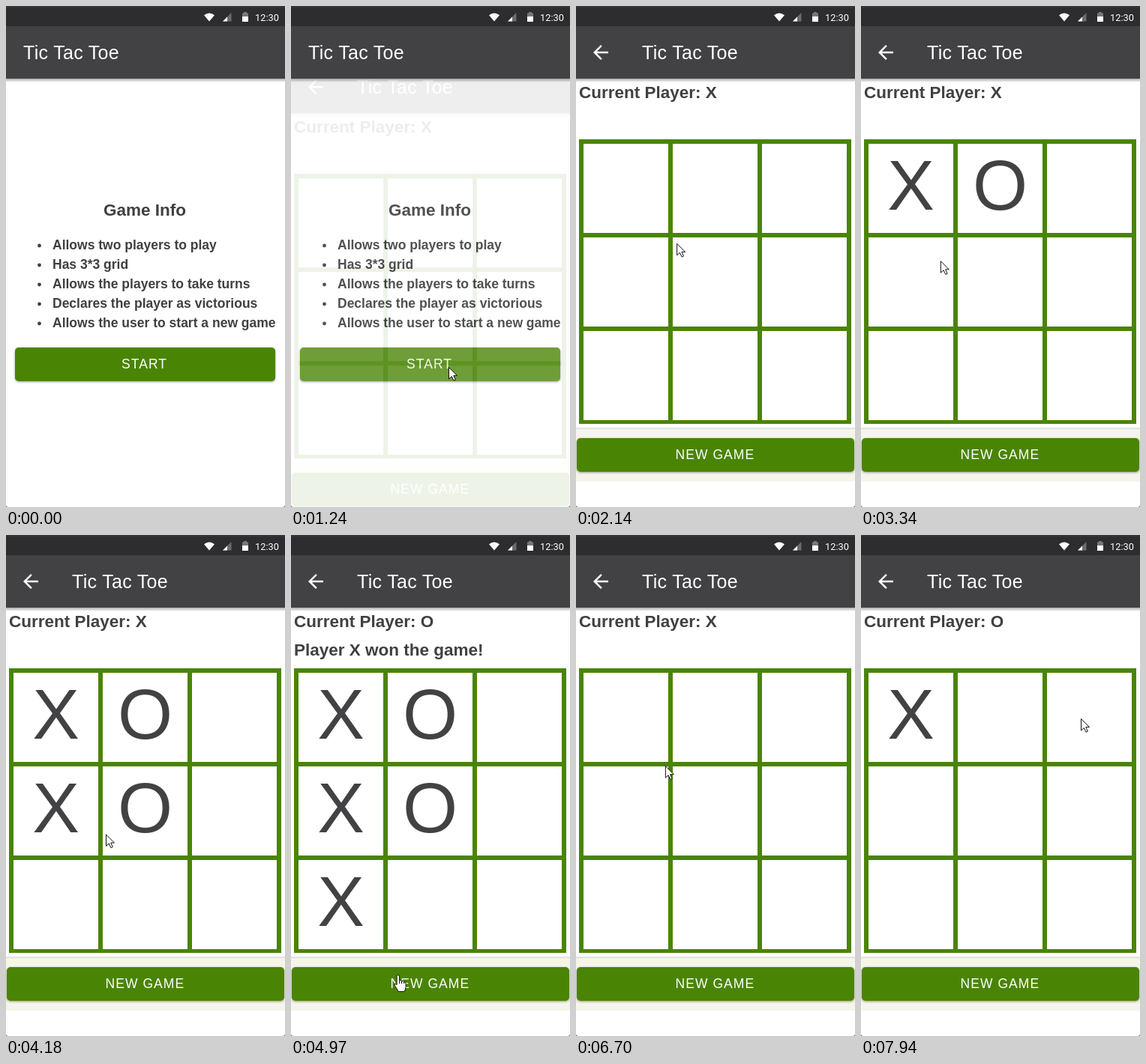
Recreate the animation shown at these times as an HTML page. Size 372 by 669 pixels, loop 8 s.

```html
<!DOCTYPE html>
<html lang="en">
<head>
<meta charset="utf-8">
<title>Tic Tac Toe</title>
<style>
  html, body { margin: 0; width: 100%; height: 100%; overflow: hidden; background: #fff; }
  svg { display: block; width: 372px; height: 669px; font-family: "Liberation Sans", Arial, sans-serif; }
  .title { font-size: 25px; letter-spacing: .0125em; fill: #fff; }
  .head { font-size: 22.5px; font-weight: bold; fill: #404042; }
  .item { font-size: 17.5px; font-weight: bold; fill: #404042; }
  .label { font-size: 17.5px; letter-spacing: .06em; fill: #fff; }
  .mark { font-size: 94px; fill: #424244; text-anchor: middle; }
  .btn { filter: drop-shadow(0 1px 1.5px rgba(0,0,0,.4)); }
</style>
</head>
<body>
<svg id="stage" viewBox="0 0 372 669"></svg>
<script>
const LOOP = 8000, GREEN = '#4a8405', DARK = '#424244';
const stage = document.getElementById('stage');
const $ = id => document.getElementById(id);
const text = (cls, x, y, s, id = '') => `<text class="${cls}" id="${id}" x="${x}" y="${y}">${s}</text>`;
const rect = (x, y, w, h, fill, extra = '') =>
  `<rect x="${x}" y="${y}" width="${w}" height="${h}" fill="${fill}" ${extra}/>`;

// Each mark: time, cell, letter
const games = {
  first: [[2560, 0, 'X'], [2920, 1, 'O'], [3510, 3, 'X'], [3870, 4, 'O'], [4480, 6, 'X']],
  second: [[7310, 0, 'X']]
};
const WIN = 4480, OPEN = 1230, RESET = 6200;

function header(x, back) {
  const arrow = '<path transform="translate(18 47) scale(1.25)" fill="#fff" ' +
    'd="M20 11H7.83l5.59-5.59L12 4l-8 8 8 8 1.41-1.41L7.83 13H20z"/>';
  return rect(0, 27, 372, 70, DARK) + rect(0, 97, 372, 5, 'url(#shade)') +
    (back ? arrow : '') + text('title', x, 71, 'Tic Tac Toe');
}

function button(id, x, y, w, label, lx) {
  return `<clipPath id="${id}Clip">${rect(x, y, w, 45, '#000', 'rx="5"')}</clipPath>` +
    rect(x, y, w, 45, GREEN, 'rx="5" class="btn"') +
    `<g clip-path="url(#${id}Clip)">` +
    rect(x, y, w, 45, '#fff', `id="${id}Hover" opacity="0"`) +
    `<circle id="${id}Ripple" fill="#fff" opacity=".05" r="0"/></g>` +
    text('label', lx, y + 28, label);
}

function home() {
  const items = ['Allows two players to play', 'Has 3*3 grid', 'Allows the players to take turns',
    'Declares the player as victorious', 'Allows the user to start a new game'];
  return rect(0, 27, 372, 642, '#fff') + header(23, false) + text('head', 130, 280, 'Game Info') +
    items.map((s, i) => `<circle cx="44.5" cy="${320 + 26 * i}" r="2.4" fill="#404042"/>` +
      text('item', 62, 325 + 26 * i, s)).join('') +
    button('home', 12, 456, 347, 'START', 154);
}

function game(id) {
  let board = '';
  for (let i = 0; i < 4; i++) {
    board += rect(4 + 119 * i, 178, 6, 380, GREEN) + rect(4, 178 + 125 * i, 363, i < 3 ? 6 : 5, GREEN);
  }
  const marks = games[id].map(([, cell, s], i) =>
    text('mark', 66.5 + 119 * (cell % 3), 272 + 125 * Math.floor(cell / 3), s, id + 'Mark' + i)).join('');
  return `<g id="${id}">` + rect(0, 27, 372, 642, '#fff') + header(88, true) +
    text('head', 4, 123, '', id + 'Turn') + text('head', 4, 161, 'Player X won the game!', id + 'Win') +
    board + marks + rect(0, 562, 372, 3, 'url(#foot)') + rect(0, 565, 372, 70, '#f5f5ea') +
    button(id, 1, 577, 370, 'NEW GAME', 132.5) + '</g>';
}

function statusBar() {
  return rect(0, 0, 372, 27, '#2d2d2f') + rect(0, 0, 372, 2, '#34343f') +
    '<path fill="#fff" d="M264 12.2Q271 7 278 12.2L271 20.5Z"/>' +
    '<path fill="#6c6c6e" d="M289 20.5L300.5 9V20.5Z"/><path fill="#fff" d="M289 20.5L295 14.5V20.5Z"/>' +
    '<path fill="#777" d="M315 9.5H317V8H321V9.5H323V14.5H315Z"/>' + rect(315, 14, 8, 7, '#fff') +
    '<text x="332" y="20" font-size="12.8" fill="#fff" font-family="Roboto, sans-serif">12:30</text>';
}

const gradient = (id, a, b) => `<linearGradient id="${id}" x1="0" y1="0" x2="0" y2="1">` +
  `<stop stop-opacity="${a}"/><stop offset="1" stop-opacity="${b}"/></linearGradient>`;

stage.innerHTML = `<defs>${gradient('shade', .32, 0)}${gradient('foot', 0, .16)}</defs>` +
  home() + game('first') + game('second') + statusBar() +
  '<path fill="#555" d="M0 666V669H3Q0 669 0 666ZM372 666V669H369Q372 669 372 666Z"/>' +
  '<g id="cursor" fill="#fff" stroke="#111" stroke-linejoin="round">' +
  '<path id="arrow" d="M.5.5V16L4.3 12.6 7 18.3 9.3 17.2 6.8 11.6H11.5Z"/>' +
  '<path id="hand" d="M-2 1.5Q-2 .5-.4.5T1.5 2V8Q3 6.5 4.5 8.5 6.5 7.5 7.5 9.5 10 9 10 12V16Q10 19 8 22.5H0' +
  'Q-2 18-4.5 15-6 12-4 12L-2 13.5ZM1.5 8V12M4.5 8.5V12M7.5 9.5V12"/></g>';

// Pointer path: time, x, y; equal neighbours make a rest
const path = [
  [0, 305, 672], [260, 305, 672], [600, 228, 505], [880, 210, 482], [1710, 210, 482],
  [2380, 103, 249], [2600, 103, 249], [2850, 185, 262], [2960, 185, 262], [3340, 106, 340],
  [3480, 92, 358], [3560, 92, 358], [3800, 178, 368], [3910, 178, 368], [4150, 140, 391],
  [4420, 78, 478], [4540, 78, 478], [4970, 143, 587], [5320, 156, 609], [6420, 156, 609],
  [6700, 119, 309], [6810, 106, 266], [7000, 85, 219], [7400, 85, 219], [7940, 293, 245], [8000, 293, 245]
];

function slope(i, k) {
  const a = path[i - 1], p = path[i], b = path[i + 1];
  const rests = q => !q || (q[1] === p[1] && q[2] === p[2]);
  return rests(a) || rests(b) ? 0 : (b[k] - a[k]) / (b[0] - a[0]);
}

function pointer(t) {
  const i = Math.max(0, path.findIndex(p => p[0] > t) - 1);
  const p = path[i], q = path[i + 1], d = q[0] - p[0], u = (t - p[0]) / d;
  return [1, 2].map(k => {
    const s = u * u * (3 - 2 * u);
    return p[k] + (q[k] - p[k]) * s +
      d * (u * (1 - u) ** 2 * slope(i, k) - u * u * (1 - u) * slope(i + 1, k));
  });
}

const clamp = v => Math.min(1, Math.max(0, v));

// cubic-bezier(.36, .66, .04, 1)
function ease(x) {
  const curve = (s, a, b) => 3 * (1 - s) ** 2 * s * a + 3 * (1 - s) * s * s * b + s ** 3;
  let lo = 0, hi = 1;
  for (let i = 0; i < 20; i++) {
    const mid = (lo + hi) / 2;
    if (curve(mid, .36, .04) < x) lo = mid; else hi = mid;
  }
  return curve(lo, .66, 1);
}

const show = (id, on) => $(id).setAttribute('visibility', on ? 'inherit' : 'hidden');

function enter(id, t, start) {
  const e = ease(clamp((t - start) / 280));
  $(id).setAttribute('visibility', t >= start ? 'visible' : 'hidden');
  $(id).setAttribute('opacity', .01 + .99 * e);
  $(id).setAttribute('transform', `translate(0 ${50 * (1 - e)})`);
}

function press(id, t, over, click, x, y) {
  const ripple = $(id + 'Ripple');
  $(id + 'Hover').setAttribute('opacity', .08 * clamp((t - over) / 250));
  ripple.setAttribute('cx', x);
  ripple.setAttribute('cy', y);
  ripple.setAttribute('r', 260 * clamp((t - click) / 175));
}

function play(id, t) {
  const count = games[id].filter(m => t >= m[0]).length;
  games[id].forEach((m, i) => show(id + 'Mark' + i, i < count));
  $(id + 'Turn').textContent = 'Current Player: ' + 'XO'[count % 2];
  show(id + 'Win', id === 'first' && t >= WIN);
}

function render(t) {
  enter('first', t, OPEN);
  enter('second', t, RESET);
  play('first', t);
  play('second', t);
  press('home', t, 600, 1060, 210, 482);
  press('first', t, 4970, 6030, 156, 609);
  const [x, y] = pointer(t);
  const hand = (t < OPEN && y < 501) || (t > 4600 && t < RESET && y > 577);
  $('cursor').setAttribute('transform', `translate(${x} ${y})`);
  show('hand', hand);
  show('arrow', !hand);
}

const began = performance.now();
function tick() {
  render((performance.now() - began) % LOOP);
  requestAnimationFrame(tick);
}
tick();
</script>
</body>
</html>
```
